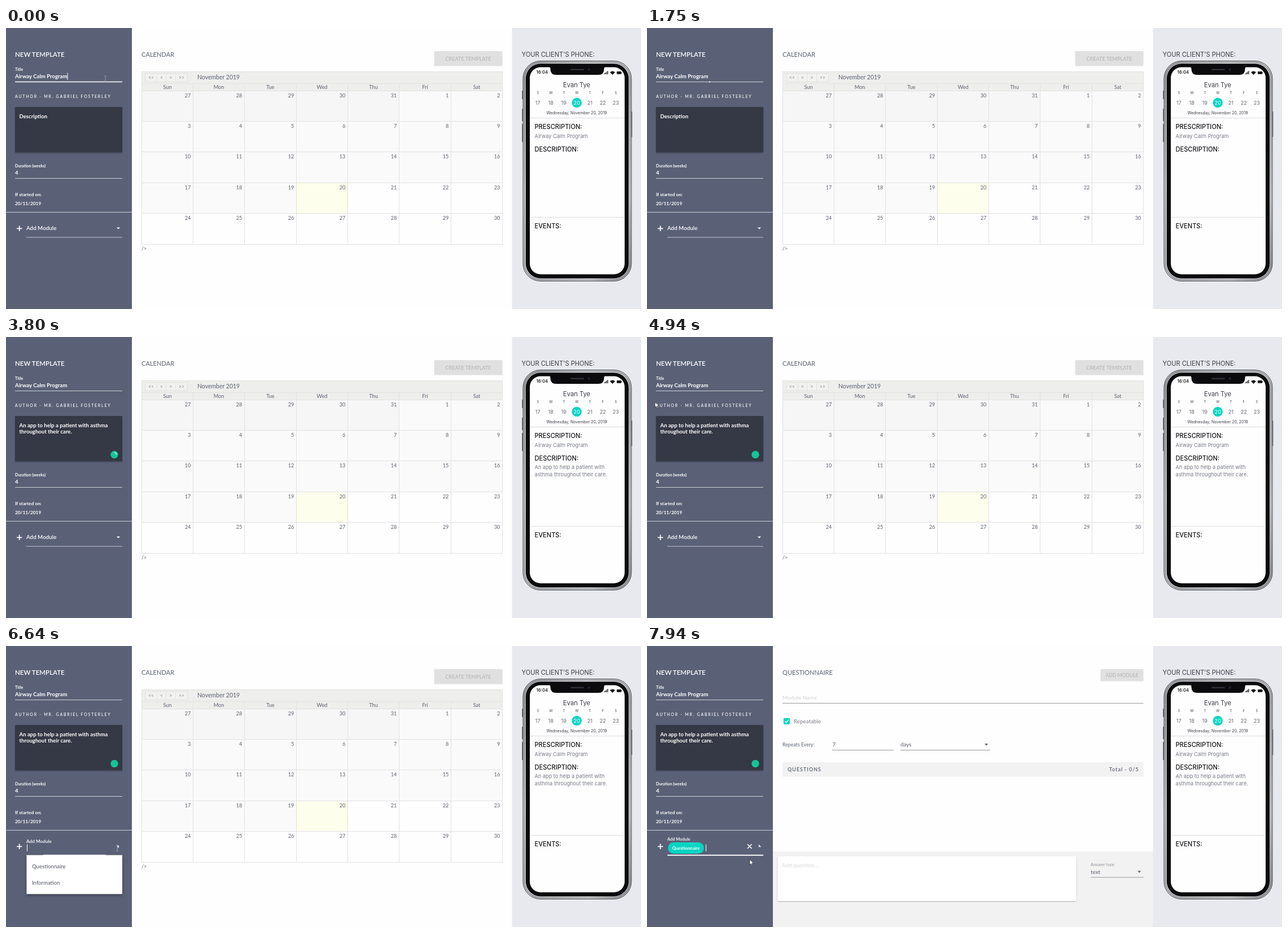
Recreate the animation shown at these times as an HTML page. Size 1125x498 px, loop 8000 ms.

```html
<!DOCTYPE html>
<html lang="en">
<head>
<meta charset="utf-8">
<title>New template</title>
<style>
html, body { margin: 0; width: 100%; height: 100%; overflow: hidden; background: #fefefe; }
svg { display: block; width: 100vw; height: 100vh; }
text { font-family: Lato, "Open Sans", sans-serif; fill: #5c6170; white-space: pre; }
.end { text-anchor: end; }
.mid { text-anchor: middle; }
.side text { fill: #fff; font-weight: 700; }
.phone text { font-family: Inter, Roboto, sans-serif; fill: #3b3d45; }
.phone .head { font-size: 11.1px; font-weight: 500; fill: #16171b; }
.phone .body { font-size: 9.2px; fill: #777a86; }
.side .small { font-size: 7.2px; }
.side .field { font-size: 9.6px; }
.side .date { font-size: 8.3px; }
.side .dark { fill: #50535f; font-size: 9.6px; font-weight: 400; }
.title { font-size: 11.1px; }
.grey { fill: #b1b1b3; }
.teal { fill: #06d5c3; }
.rule { stroke: #999; stroke-width: 1; }

/* 1% is 80 ms */
.caret, .from, .until, .beam, .arrow { animation: 8s step-end infinite; }
.titleCaret { animation-name: titleCaret; }
@keyframes titleCaret { 0% { opacity: 1 } 2% { opacity: 0 } 8.625% { opacity: 1 } 15.25%, 100% { opacity: 0 } }
.moduleCaret { animation-name: moduleCaret; }
@keyframes moduleCaret { 0% { opacity: 0 } 82.5% { opacity: 1 } 89.1%, 100% { opacity: 0 } }
.hint { animation-name: hint; }
@keyframes hint { 0% { opacity: 1 } 28.125%, 100% { opacity: 0 } }
.badge { animation-name: badge; }
@keyframes badge { 0% { opacity: 0 } 33.125%, 100% { opacity: 1 } }
.loading { animation-name: loading; }
@keyframes loading { 0% { opacity: 1 } 60%, 100% { opacity: 0 } }
.mirror { animation-name: mirror; }
@keyframes mirror { 0% { opacity: 0 } 39.125%, 100% { opacity: 1 } }
.menu { animation-name: menu; }
@keyframes menu { 0% { opacity: 0 } 82.875% { opacity: 1 } 99.125%, 100% { opacity: 0 } }
.chosen { animation-name: chosen; }
@keyframes chosen { 0% { opacity: 0 } 99.125%, 100% { opacity: 1 } }
.hover { animation-name: hover; }
@keyframes hover { 0% { opacity: .65 } 72.5%, 100% { opacity: 1 } }

.spin { transform-origin: 192px 208.5px; animation: spin .95s linear infinite; }
@keyframes spin { to { transform: rotate(360deg) } }
.titleLine { transform-origin: 111px 0; animation: titleLine 8s infinite; }
@keyframes titleLine {
  0% { transform: scaleX(1) }
  17.125% { transform: scaleX(1); animation-timing-function: cubic-bezier(.25, .8, .5, 1) }
  21.9% { transform: scaleX(.012) }
  23.125%, 100% { transform: scaleX(0) }
}
.moduleLine, .label, .chevron { animation: 8s cubic-bezier(.25, .8, .5, 1) infinite; }
.moduleLine { transform-origin: 121px 0; animation-name: moduleLine; }
@keyframes moduleLine { 0%, 81.94% { transform: scaleX(0) } 85.69%, 100% { transform: scaleX(1) } }
.label { animation-name: label; }
@keyframes label {
  0%, 81.94% { transform: translate(36px, 358px) }
  85.69%, 100% { transform: translate(36px, 345px) scale(.763) }
}
.chevron { animation-name: chevron; }
@keyframes chevron {
  0%, 81.94% { transform: translate(199px, 355px) }
  85.69%, 99.12% { transform: translate(199px, 355px) rotate(-180deg) }
  99.125%, 100% { transform: translate(199px, 355px) rotate(45deg) }
}
.ripple { transform-origin: 173px 391px; animation: ripple 8s linear infinite; }
@keyframes ripple { 0%, 95.5% { transform: scale(0) } 96.75% { transform: scale(1) } 97.5%, 100% { transform: scale(1.2) } }

.mouse { animation: mouse 8s linear infinite; }
@keyframes mouse {
  0%, .25% { transform: translate(176px, 90px) }
  2.5% { transform: translate(205px, 110px) }
  5% { transform: translate(226px, 160px) }
  7.5% { transform: translate(222px, 215px) }
  10.25% { transform: translate(203px, 248px) }
  11.5% { transform: translate(120px, 253px) }
  12.75%, 61.2% { transform: translate(36px, 253px) }
  61.25% { transform: translate(10px, 106px) }
  63.75% { transform: translate(30px, 150px) }
  66.25% { transform: translate(110px, 260px) }
  69.25%, 71.75% { transform: translate(189px, 352px) }
  74.25%, 77% { transform: translate(181px, 373px) }
  80.5% { transform: translate(197px, 355px) }
  83%, 86% { transform: translate(197px, 358px) }
  90.5% { transform: translate(180px, 380px) }
  95.5%, 97.5% { transform: translate(173px, 387px) }
  99.25%, 100% { transform: translate(182px, 378px) }
}
.beam { animation-name: beam; }
@keyframes beam {
  0% { opacity: 1 } 2.5% { opacity: 0 } 10.25% { opacity: 1 } 17.125% { opacity: 0 }
  80.5% { opacity: 1 } 87%, 100% { opacity: 0 }
}
.arrow { animation-name: arrow; }
@keyframes arrow {
  0% { opacity: 0 } 2.5% { opacity: 1 } 10.25% { opacity: 0 } 61.25% { opacity: 1 }
  80.5% { opacity: 0 } 87%, 100% { opacity: 1 }
}
</style>
</head>
<body>
<svg viewBox="0 0 1125 498" preserveAspectRatio="none">
  <defs>
    <linearGradient id="steel" x1="0" y1="0" x2="1" y2="1">
      <stop offset="0" stop-color="#a9aaae"/><stop offset=".3" stop-color="#e2e3e6"/>
      <stop offset=".55" stop-color="#c4c5c9"/><stop offset=".8" stop-color="#e6e7ea"/>
      <stop offset="1" stop-color="#9b9ca0"/>
    </linearGradient>
    <filter id="soft" x="-10%" y="-10%" width="120%" height="130%">
      <feDropShadow dx="0" dy="1" stdDeviation="1" flood-opacity=".28"/>
    </filter>
    <filter id="deep" x="-10%" y="-15%" width="120%" height="140%">
      <feDropShadow dx="0" dy="2" stdDeviation="2.5" flood-opacity=".4"/>
    </filter>
    <clipPath id="item"><rect x="36.5" y="376" width="169.5" height="29.5"/></clipPath>
  </defs>

  <rect width="1125" height="498" fill="#fefefe"/>

  <g>
    <text class="title" x="240" y="51">CALENDAR</text>
    <rect x="758.5" y="41" width="121" height="26.5" fill="#e0e0e0"/>
    <text class="mid grey" x="819" y="57.5" font-size="9.2">CREATE TEMPLATE</text>
    <g id="calendar"></g>
    <text x="240" y="393.5" font-size="9">/&gt;</text>
  </g>

  <g class="from chosen">
    <rect x="223" width="674" height="498" fill="#fefefe"/>
    <rect x="223" y="364" width="674" height="134" fill="#f2f2f2"/>
    <text class="title" x="240" y="51">QUESTIONNAIRE</text>
    <rect x="803.5" y="41" width="76" height="21.5" fill="#e0e0e0"/>
    <text class="mid grey" x="841.5" y="55" font-size="8.6">ADD MODULE</text>
    <text x="240" y="95" font-size="9.8" style="fill:#d2d2d4">Module Name</text>
    <path class="rule" d="M240 101.5H879.5M328 184.5H437M449 184.5H608M786 410H879.5"/>
    <rect class="teal" x="242" y="127.7" width="11" height="11" rx="1"/>
    <path d="M244.2 133.3l2.3 2.4 4.6-5" fill="none" stroke="#fff" stroke-width="1.3"/>
    <text x="260" y="136.5" font-size="9.9" style="fill:#7b7d86">Repeatable</text>
    <text x="240" y="177.7" font-size="8.8">Repeats Every:</text>
    <text x="328.5" y="178" font-size="9.9">7</text>
    <text x="449" y="178" font-size="9.9">days</text>
    <path d="M598 173h6.4l-3.2 3.4zM869 398.5h6.4l-3.2 3.4z" fill="#666"/>
    <rect x="240" y="206" width="639.5" height="25.5" fill="#f2f2f2"/>
    <g font-size="9" font-weight="600" letter-spacing="1">
      <text x="249" y="222">QUESTIONS</text>
      <text class="end" x="871.5" y="222">Total - 0/5</text>
    </g>
    <rect x="231.5" y="372.5" width="529" height="79.5" rx="1" fill="#fff" filter="url(#soft)"/>
    <text x="239" y="392" font-size="9.6" font-weight="600" style="fill:#dcdcde">Add question...</text>
    <text x="786" y="390" font-size="7.6" style="fill:#94969c">Answer type</text>
    <text x="786" y="403.5" font-size="9.9">text</text>
  </g>

  <g class="side">
    <rect width="223" height="498" fill="#5a6177"/>
    <text x="16" y="50.7" font-size="11.5" style="font-weight:600">NEW TEMPLATE</text>
    <text class="small" x="16" y="75.5">Title</text>
    <text class="field" id="title" x="16" y="89">Airway Calm Program</text>
    <path class="caret titleCaret" id="titleCaret" d="M0 79.5V92" stroke="#fff"/>
    <path d="M16 95.5H206M16 266.5H206" stroke="#fff" opacity=".7"/>
    <rect class="titleLine" x="16" y="94.7" width="190" height="1.5" fill="#fff"/>
    <text x="16" y="124" font-size="7" letter-spacing="1.75" style="font-weight:500">AUTHOR - MR. GABRIEL FOSTERLEY</text>

    <rect x="16" y="140" width="190" height="80.5" rx="1" fill="#363945" filter="url(#soft)"/>
    <text class="until hint field" x="23.5" y="160">Description</text>
    <text class="field" id="line1" x="23.5" y="160"></text>
    <text class="field" id="line2" x="23.5" y="171"></text>
    <path id="descCaret" d="M.5 -9V2.5" stroke="#fff"/>
    <g class="from badge">
      <circle cx="192" cy="208.5" r="6.7" fill="#15c39a"/>
      <g class="until loading"><path class="spin" d="M192 204.8a3.7 3.7 0 0 1 3.7 3.7" fill="none" stroke="#fff" stroke-width="1.2"/></g>
    </g>

    <text class="small" x="16" y="246.5">Duration (weeks)</text>
    <text class="field" x="16" y="260">4</text>
    <text class="date" x="16" y="297.5">If started on:</text>
    <text class="date" x="16" y="314.3">20/11/2019</text>
    <path d="M0 326.5H223" stroke="#fff" opacity=".7"/>

    <path d="M19 355.3h9.4M23.7 350.6v9.4" stroke="#fff" stroke-width="1.7"/>
    <text class="label" font-size="9.8" style="font-weight:600">Add Module</text>
    <path class="chevron" d="M-3.2 -1.6H3.2L0 1.6z" fill="#fff"/>
    <path class="until hover" d="M36 371H206" stroke="#fff"/>
    <path class="caret moduleCaret" d="M37.5 351.5V364" stroke="#fff"/>
    <g class="from menu">
      <rect x="36.5" y="371" width="169.5" height="68.5" fill="#fff" filter="url(#deep)"/>
      <g clip-path="url(#item)"><circle class="ripple" cx="173" cy="391" r="123.5" fill="#bfbfbf"/></g>
      <text class="dark" x="46" y="394">Questionnaire</text>
      <text class="dark" x="46" y="423.3">Information</text>
    </g>
    <rect class="moduleLine" x="36.5" y="369.8" width="169.5" height="1.6" fill="#fff"/>
    <g class="from chosen">
      <rect class="teal" x="37" y="348" width="64" height="20" rx="10"/>
      <text class="mid" x="69" y="360.5" font-size="7.7">Questionnaire</text>
      <path d="M104.5 351.5V364" stroke="#fff"/>
      <path d="M178 351.3l7.6 7.6M185.6 351.3l-7.6 7.6" stroke="#fff" stroke-width="1.5"/>
    </g>
  </g>

  <g class="phone">
    <rect x="896.5" width="228.5" height="498" fill="#e8e9ef"/>
    <text x="913.5" y="51.3" font-size="11.1">YOUR CLIENT'S PHONE:</text>
    <path d="M915 111v15M915 143v22M915 170v32M1108.5 148v45" stroke="#55565a" stroke-width="1.6"/>
    <rect x="916" y="58.5" width="192" height="390" rx="31" fill="url(#steel)" stroke="#3c3d40"/>
    <rect x="918.4" y="60.9" width="187.2" height="385.2" rx="29" fill="none" stroke="#4c4d51" stroke-width=".8"/>
    <rect x="920.8" y="63.3" width="182.4" height="380.4" rx="26.5" fill="#0b0b0d"/>
    <rect x="928" y="69.5" width="168" height="367" rx="19" fill="#fefefe"/>
    <path d="M960 68h104q-4.5 0-4.5 5 0 10-10 10h-75q-10 0-10-10 0-5-4.5-5z" fill="#0b0b0d"/>
    <rect x="1000" y="72.5" width="24" height="2.6" rx="1.3" fill="#303036"/>
    <circle cx="1032.5" cy="73.8" r="2" fill="#23283a"/>
    <text x="939.5" y="81" font-size="7.8" font-weight="500" style="fill:#111">16:04</text>
    <path d="M1060 82v-1.5M1062 82v-3M1064 82v-4.5M1066 82v-6" stroke="#111" stroke-width="1.2"/>
    <path d="M1070 78.5q4.5-4 9 0l-4.5 4.5z" fill="#111"/>
    <rect x="1082" y="77" width="8" height="4.8" rx="1" fill="#111"/>
    <path d="M1090.7 78.5v1.8" stroke="#111"/>
    <text class="mid" x="1011" y="104.5" font-size="11.2">Evan Tye</text>
    <circle class="teal" cx="1011.2" cy="132.4" r="8.7"/>
    <g id="week"></g>
    <text class="mid" x="1011" y="152.7" font-size="7">Wednesday, November 20, 2019</text>
    <path d="M928 159.5H1096M929 335.5H1094" stroke="#dcdce0"/>
    <text class="head" x="936.5" y="179">PRESCRIPTION:</text>
    <text class="body" x="936.5" y="194.7">Airway Calm Program</text>
    <text class="head" x="936.5" y="218.5">DESCRIPTION:</text>
    <g class="from mirror">
      <text class="body" x="936.5" y="234">An app to help a patient with</text>
      <text class="body" x="936.5" y="247">asthma throughout their care.</text>
    </g>
    <text class="head" x="936.5" y="354.7">EVENTS:</text>
  </g>

  <g class="mouse">
    <path class="beam" d="M-2 -5h1.5l.5 .5 .5-.5H2M0 -4.5V4.5M-2 5h1.5l.5-.5 .5 .5H2" fill="none" stroke="#a5a9b5" stroke-width=".9"/>
    <path class="arrow" d="M0 0V9.8L2.2 7.8 3.7 11.2 5.3 10.5 3.8 7.2H6.7z" fill="#fff" stroke="#26282e" stroke-width=".8"/>
  </g>
</svg>

<script>
const LOOP = 8000, TYPE_FROM = 2250, TYPE_TO = 3030;
const LINES = ['An app to help a patient with asthma', 'throughout their care.'];
const $ = id => document.getElementById(id);

function add(parent, tag, attrs, content) {
  const node = document.createElementNS('http://www.w3.org/2000/svg', tag);
  for (const key in attrs) node.setAttribute(key, attrs[key]);
  if (content !== undefined) node.textContent = content;
  return parent.appendChild(node);
}

function drawCalendar() {
  const cal = $('calendar');
  const colX = i => Math.floor(240 + i * 91.35) + .5;
  const rowY = i => Math.floor(111 + i * 54.45) + .5;
  const box = (x, y, right, bottom, fill) =>
    add(cal, 'rect', { x, y, width: right - x, height: bottom - y, fill, stroke: '#e1e1e1' });
  const label = (x, y, size, content, align = '') =>
    add(cal, 'text', { x, y, 'font-size': size, class: align }, content);

  box(colX(0), 77.5, colX(7), 98.5, '#eeeeec');
  [[246.5, 267.5, '<<'], [267.5, 283.5, '<'], [283.5, 300.5, '>'], [300.5, 321.5, '>>']].forEach(([x, right, sign]) => {
    box(x, 80.5, right, 95.5, '#f1f1ef');
    label((x + right) / 2, 91.3, 8.5, sign, 'mid').style.fill = '#85878d';
  });
  label(339, 91.3, 10.5, 'November 2019');
  'Sun Mon Tue Wed Thu Fri Sat'.split(' ').forEach((day, i) => {
    box(colX(i), 98.5, colX(i + 1), rowY(0), '#eeeeec');
    label((colX(i) + colX(i + 1)) / 2, 107.6, 9.2, day, 'mid');
  });
  for (let i = 0; i < 35; i++) {
    const day = i - 4, col = i % 7, row = Math.floor(i / 7);
    const fill = day < 1 ? '#f6f6f6' : day < 20 ? '#fafafa' : day === 20 ? '#fefeec' : '#fefefe';
    box(colX(col), rowY(row), colX(col + 1), rowY(row + 1), fill);
    label(colX(col + 1) - 4.3, rowY(row) + 11.2, 9.1, day < 1 ? 31 + day : day, 'end');
  }
}

function drawWeek() {
  [...'SMTWTFS'].forEach((letter, i) => {
    const x = 942.3 + i * 23, today = i === 3;
    add($('week'), 'text', { x, y: 117, class: 'mid', 'font-size': 5.8 }, letter);
    add($('week'), 'text', { x, y: 135.7, class: 'mid', 'font-size': 9.2,
      style: `fill:${today ? '#fff' : '#686b76'}` }, 17 + i);
  });
}

function type(t) {
  const total = LINES[0].length + LINES[1].length;
  const part = Math.min(1, Math.max(0, (t - TYPE_FROM) / (TYPE_TO - TYPE_FROM)));
  const count = Math.ceil(part * total);
  $('line1').textContent = LINES[0].slice(0, count);
  $('line2').textContent = LINES[1].slice(0, Math.max(0, count - LINES[0].length));
  const second = count > LINES[0].length;
  const width = $(second ? 'line2' : 'line1').getComputedTextLength();
  const blinkOn = t < TYPE_TO || Math.floor((t - TYPE_TO) / 530) % 2 === 0;
  $('descCaret').setAttribute('transform', `translate(${23.5 + width} ${second ? 171 : 160})`);
  $('descCaret').setAttribute('opacity', t >= TYPE_FROM && t < 4900 && blinkOn ? 1 : 0);
}

drawCalendar();
drawWeek();
$('titleCaret').setAttribute('transform', `translate(${16.5 + $('title').getComputedTextLength()} 0)`);

let start;
function frame(now) {
  start ??= now;
  type((now - start) % LOOP);
  requestAnimationFrame(frame);
}
requestAnimationFrame(frame);
</script>
</body>
</html>
```
